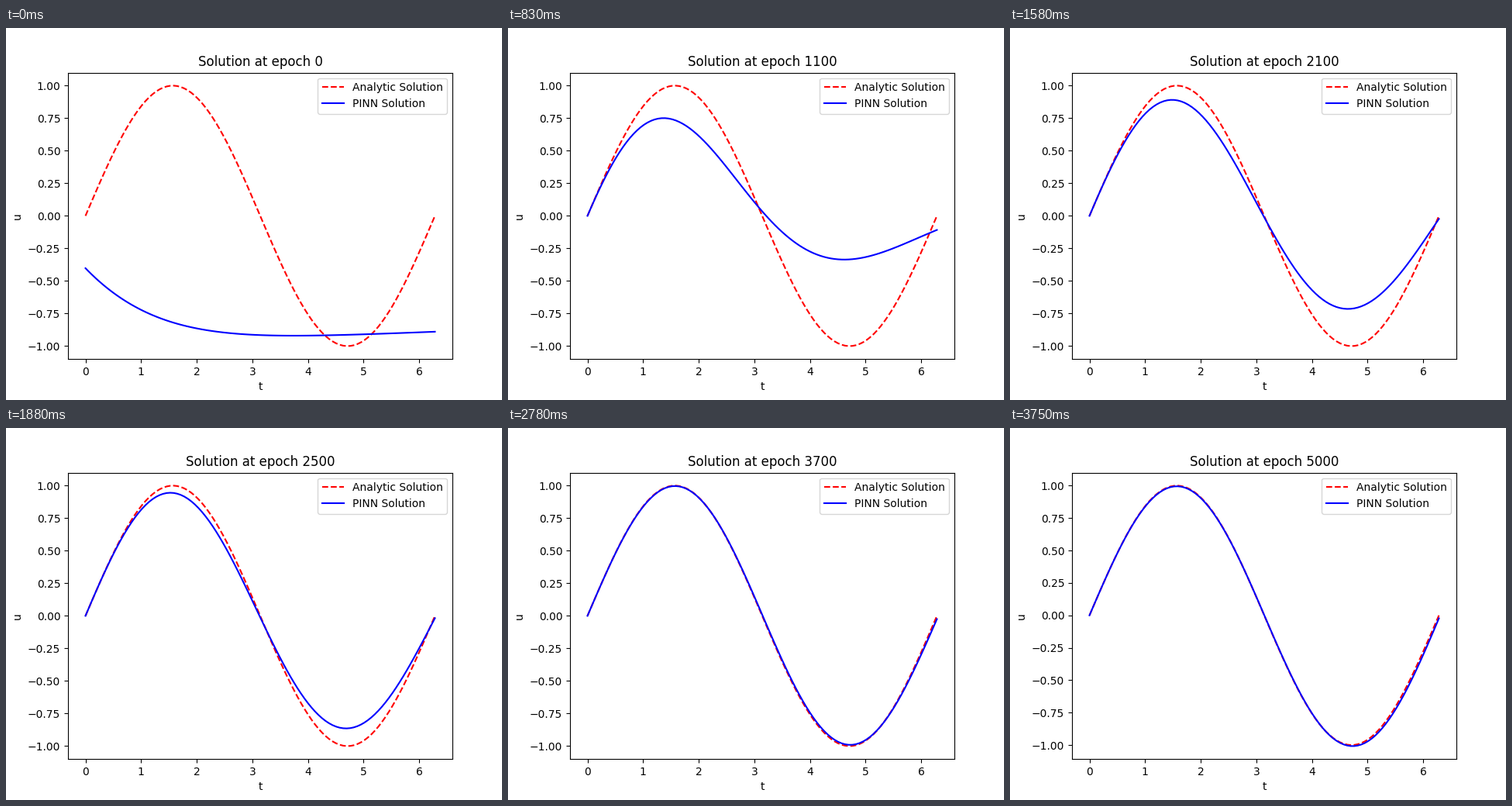
Write a matplotlib script that moves like this. It is 640x480 px and loops after 4510 ms.

```python
import numpy as np
import matplotlib.pyplot as plt
from matplotlib.animation import FuncAnimation

LOOP_MS, STEP_MS = 4510, 10
LAST = 50     # training snapshots, one per 100 epochs
WARM_UP = 600  # epochs until the curve first looks like a wave

t = np.linspace(0, 2 * np.pi, 100)
exact = np.sin(t)

# Shape of the damped wave: epoch, decay, curvature of decay, lag, lead
STAGES = np.array([
    (600, .275, -.003, 1.735, 0),
    (1100, .18, .01, .52, 0),
    (1800, .107, -.001, .047, .02),
    (2500, .039, -.0017, .021, .015),
    (3200, .0065, 0, .022, 0),
    (3700, .002, 0, .025, -.006),
    (4800, .001, 0, .021, 0),
    (5000, .0056, -.00155, .022, 0),
]).T


def wave(epoch):
    decay, bend, lag, lead = (np.interp(epoch, STAGES[0], row)
                              for row in STAGES[1:])
    power = 3.1 - 0.29 * lag
    phase = t - lag * (t / (2 * np.pi)) ** power + lead * np.sin(t / 2)
    return np.exp(-decay * t - bend * t ** 2) * np.sin(phase)


def untrained():
    return -1 + 0.0175 * t + 0.598 * np.exp(-0.77 * t - 0.06 * t ** 2)


def solution(epoch):
    s = min(epoch / WARM_UP, 1)
    ease = s * (2 - s)
    return (1 - ease) * untrained() + ease * wave(epoch)


fig, ax = plt.subplots(figsize=(6.4, 4.8), dpi=100)
ax.plot(t, exact, "r--", label="Analytic Solution")
learned, = ax.plot(t, solution(0), "b-", label="PINN Solution")
title = ax.set_title("Solution at epoch 0", y=1.0)
ax.set_xlabel("t")
ax.set_ylabel("u")
ax.set_xticks(range(7))
ax.set_yticks(np.arange(-1, 1.01, 0.25))
ax.legend(loc="upper right")


def draw(frame):
    epoch = 100 * min(2 * frame // 15, LAST)  # a new snapshot every 75 ms
    u = solution(epoch)
    learned.set_ydata(u)
    title.set_text(f"Solution at epoch {epoch}")
    low = min(exact.min(), u.min())
    high = max(exact.max(), u.max())
    pad = 0.05 * (high - low)
    ax.set_ylim(low - pad, high + pad)
    return learned, title


anim = FuncAnimation(fig, draw, frames=LOOP_MS // STEP_MS, interval=STEP_MS,
                     repeat=True, repeat_delay=0, blit=False)
plt.show()
```
